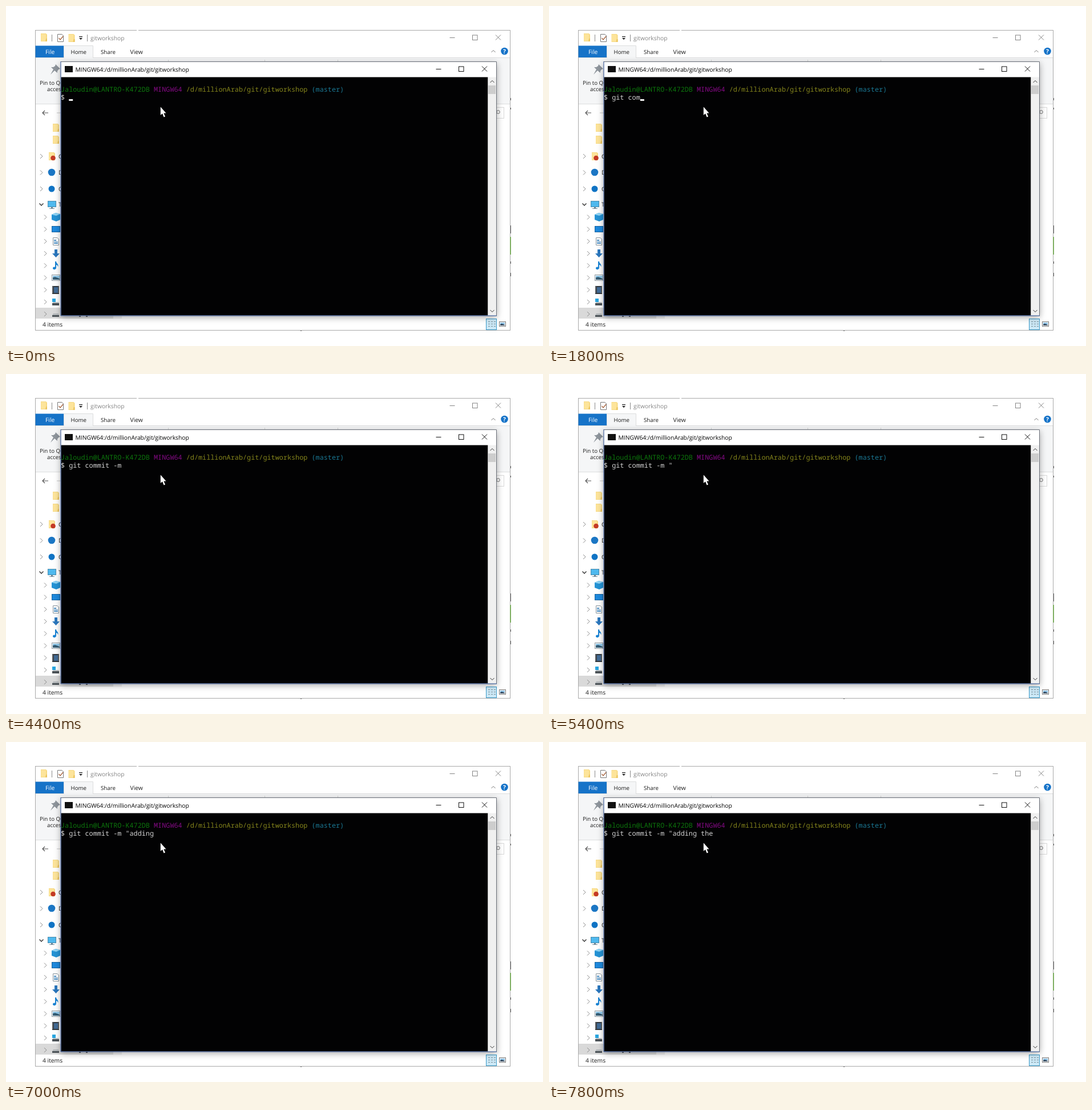
Recreate the animation shown at these times as an HTML page. Size 941x595 px, loop 8000 ms.

```html
<!DOCTYPE html>
<html lang="en">
<head>
<meta charset="utf-8">
<title>Terminal typing</title>
<style>
  html, body { margin: 0; width: 100%; height: 100%; overflow: hidden; background: #fff; }
  svg { display: block; width: 941px; height: 595px; }
  text { white-space: pre; text-rendering: geometricPrecision; }
  .ui { font: 10.3px "Open Sans", "Noto Sans", sans-serif; fill: #1c1c1c; }
  .small { font-size: 9.7px; }
  .mono { font: 11.82px "Noto Sans Mono", "DejaVu Sans Mono", monospace; }
  .line { fill: none; stroke-width: 1; }
</style>
</head>
<body>
<svg viewBox="0 0 941 595">
  <defs>
    <filter id="shadow" x="-5%" y="-5%" width="110%" height="112%">
      <feDropShadow dx="0" dy="3" stdDeviation="6" flood-color="#000" flood-opacity=".34"/>
    </filter>
    <g id="folder">
      <path d="M0 0H9L11 2V14H0Z" fill="#f6d983"/>
      <path d="M.5 1H9V13H.5Z" fill="#fde49a"/>
      <path d="M9 9H11V14H8Z" fill="#ecc661"/>
    </g>
    <path id="right" class="line" d="M-2 -4L2 0L-2 4"/>
    <path id="up" class="line" d="M-3.5 2L0 -1.5L3.5 2"/>
    <g id="controls" class="line">
      <path d="M-44.500 .5H-35.500"/>
      <rect x="-4.500" y="-4" width="8.500" height="8.500"/>
      <path d="M36 -4.500L45 4.500M45 -4.500L36 4.500"/>
    </g>
  </defs>

  <!-- File manager -->
  <rect x="51.500" y="42.500" width="832" height="525" fill="#fff" stroke="#a9a9a9"/>
  <rect x="229" y="42" width="3" height="1" fill="#fff"/>
  <rect x="516" y="568" width="2" height="1" fill="#777"/>
  <g fill="#666">
    <rect x="884" y="161" width="1" height="4"/>
    <rect x="884" y="178" width="1" height="3"/>
    <rect x="884" y="384" width="1" height="14"/>
    <rect x="883" y="404" width="2" height="31" fill="#7fae62"/>
    <rect x="884" y="447" width="1" height="4"/>
    <rect x="884" y="467" width="1" height="6"/>
  </g>
  <use href="#folder" x="61" y="48"/>
  <use href="#folder" x="109.500" y="49"/>
  <path class="line" d="M80.500 50V62M142.500 50V62" stroke="#8a8a8a"/>
  <path class="line" d="M90.500 49.500H98L100.500 52V62.500H90.500Z" stroke="#777"/>
  <path class="line" d="M92.500 56L95 59L100 53" stroke="#a8643f" style="stroke-width:1.300"/>
  <path d="M128 53H134V54.200H128ZM128 56H134L131 59Z" fill="#222"/>
  <text class="ui" x="148" y="59.500" style="fill:#858585">gitworkshop</text>
  <use href="#controls" x="822" y="55" stroke="#848484"/>

  <rect x="52" y="90" width="831" height="81" fill="#f5f6f7"/>
  <path class="line" d="M52 90.500H883M52 171.500H883" stroke="#dcddde"/>
  <rect x="51.500" y="69.500" width="50" height="20.500" fill="#1673c8"/>
  <path d="M101.500 91V69.500H152.500V91" fill="#f5f6f7" stroke="#dcddde"/>
  <g class="ui">
    <text x="69" y="83.500" style="fill:#fff">File</text>
    <text x="113.500" y="83.500" class="small">Home</text>
    <text x="166" y="83.500" class="small">Share</text>
    <text x="217.500" y="83.500">View</text>
    <text x="59" y="137.500" class="small">Pin to Quick</text>
    <text x="72" y="149" class="small">access</text>
    <text x="64" y="561">4 items</text>
  </g>
  <use href="#up" x="854" y="79" stroke="#777"/>
  <circle cx="873.500" cy="79" r="6.300" fill="#1673c8"/>
  <text class="ui" x="873.500" y="82.700" text-anchor="middle" style="fill:#fff;font-weight:700">?</text>
  <path d="M87 102L95 110L92 111L90 114L90 117L85 113L78 120L83 111L79 107H83L86 105Z" fill="#8d949b"/>
  <path class="line" d="M284.500 94V98M453.500 94V98M581.500 94V98" stroke="#d5d6d7"/>

  <path class="line" d="M74 187H64M68 183L64 187L68 191" stroke="#555" style="stroke-width:1.200"/>
  <path class="line" d="M89 187H96" stroke="#c4c4c4"/>
  <rect x="700.500" y="177.500" width="172" height="19" fill="#fff" stroke="#d9d9d9"/>
  <circle class="line" cx="862.500" cy="185.500" r="2.800" stroke="#666"/>

  <!-- Navigation pane -->
  <rect x="52" y="528" width="136" height="19" fill="#d9d9d9"/>
  <rect x="188" y="528" width="15" height="19" fill="#efefef"/>
  <g id="chevrons" stroke="#8c8c8c"></g>
  <path class="line" d="M58.500 345.500L62 349L65.500 345.500" stroke="#333" style="stroke-width:1.400"/>
  <g class="ui">
    <text x="92" y="267">C</text>
    <text x="92" y="295">D</text>
    <text x="92" y="324">O</text>
    <text x="92" y="351">T</text>
  </g>
  <use href="#folder" x="82" y="206"/>
  <use href="#folder" x="82" y="227"/>
  <use href="#folder" x="75" y="256"/>
  <circle cx="82.500" cy="266" r="4.300" fill="#c43a25"/>
  <circle cx="80" cy="291" r="6.300" fill="#1b76c4"/>
  <circle cx="80" cy="320" r="5.500" fill="#0f73c4"/>
  <rect x="73.500" y="341.500" width="14" height="10" fill="#4fb9ee" stroke="#4b8cad"/>
  <path d="M79 352H82V354H85V355H76V354H79Z" fill="#6f8796"/>
  <path d="M80 365L87 362L95 364V374L88 377L80 374Z" fill="#2492d4"/>
  <path d="M80 365L87 362L95 364L88 367Z" fill="#8fd3f4"/>
  <rect x="80.500" y="385.500" width="14" height="10" fill="#1d88dc" stroke="#17639f"/>
  <path d="M82.500 405.500H90L92.500 408V418.500H82.500Z" fill="#fff" stroke="#87949d"/>
  <path d="M84 409H88V411H84ZM84 412H91V413H84ZM84 414H91V416H84Z" fill="#4c8fc4"/>
  <path d="M85 426H90V433H94L87.500 440L81 433H85Z" fill="#2b77bd"/>
  <path d="M86 447H88C88 451 93 451 91 457C91 453 88 453 88 453V458C88 462 82 462 82 459C82 457 84 456 86 457Z" fill="#1b84d4"/>
  <rect x="80.500" y="470.500" width="14" height="10" fill="#fff" stroke="#8b979e"/>
  <path d="M82 472H94V476H82Z" fill="#8fc8ea"/>
  <path d="M82 475L86 474L94 477V479H82Z" fill="#345d75"/>
  <rect x="81" y="490" width="12" height="14" fill="#30363c"/>
  <rect x="84" y="492" width="7" height="10" fill="#426b96"/>
  <path d="M82 491V503M92 491V503" stroke="#ccc" stroke-dasharray="1 1"/>
  <rect x="81" y="512" width="6" height="6" fill="#29a5df"/>
  <path d="M83 518H92L93 520H81Z" fill="#c2c6c9"/>
  <rect x="81" y="520" width="12" height="4" fill="#4c5358"/>
  <path d="M83 538H92L93 541H81Z" fill="#b4b8bb"/>
  <rect x="81" y="541" width="12" height="3" fill="#4c5358"/>
  <path d="M128 542H131V544H128ZM140 542H143V544H140Z" fill="#555"/>

  <!-- Status bar view buttons -->
  <rect x="841.500" y="547.500" width="18" height="19" fill="#cbe8f6" stroke="#3c9bc9"/>
  <path class="line" d="M845 552.500H848M845 556.500H848M845 560.500H848M850 552.500H853M855 552.500H858M850 556.500H853M855 556.500H858M850 560.500H853M855 560.500H858" stroke="#7d8d96"/>
  <rect x="864.500" y="552.500" width="11" height="8" fill="#fff" stroke="#777"/>
  <path d="M866 554H874V557H866Z" fill="#8fc3e6"/>
  <path d="M866 557L869 556L874 558V559H866Z" fill="#31465c"/>

  <!-- Terminal -->
  <rect x="96" y="97" width="764" height="445" fill="#fff" filter="url(#shadow)"/>
  <rect x="96.500" y="124.500" width="748" height="417" fill="#020203"/>
  <rect x="844.500" y="124.500" width="15" height="417" fill="#f0f0f0"/>
  <rect x="845" y="139" width="13" height="15" fill="#cdcdcd"/>
  <use href="#up" x="852" y="132" stroke="#333" style="stroke-width:1.400"/>
  <use href="#up" transform="translate(852 534) scale(1 -1)" stroke="#333"/>
  <path class="line" d="M96 97.500H859.500V542" stroke="#6a6f78"/>
  <path class="line" d="M96 97V542H860" stroke="#25498f"/>
  <rect x="103" y="105" width="14" height="11" fill="#111"/>
  <text class="ui" x="121.500" y="114.500" style="fill:#000">MINGW64:/d/millionArab/git/gitworkshop</text>
  <use href="#controls" x="798" y="110" stroke="#111"/>
  <text class="mono" x="96" y="150"><tspan fill="#0d760d">Jaloudin@LANTRO-K472DB</tspan> <tspan fill="#850b85">MINGW64</tspan> <tspan fill="#85851c">/d/millionArab/git/gitworkshop</tspan> <tspan fill="#1b7894">(master)</tspan></text>
  <text class="mono" id="command" x="96" y="164" fill="#d2d2d2"></text>
  <rect id="caret" y="163" width="7" height="3" fill="#f0f0f0"/>
  <path d="M270.800 176.500V191L274 188.200L276.600 194.500L279 193.500L276.400 187.400H280.500Z" fill="#fff"/>
</svg>
<script>
  const LOOP = 8000, STEP = 200, CHAR = 7.092, LEFT = 96;
  const BLINK = 1060, OFF_FROM = 90, OFF_TO = 650;
  const prompt = "$ ", typed = 'git commit -m "adding the';
  // [time, characters typed]
  const keys = [
    [0, 0], [800, 1], [1000, 2], [1200, 3], [1400, 4], [1600, 5], [1800, 7],
    [2000, 8], [2200, 9], [2400, 10], [2800, 11],
    [3800, 12], [4200, 13], [4600, 14], [5200, 15],
    [5600, 16], [5800, 17], [6200, 18], [6400, 19], [6600, 20], [6800, 21],
    [7200, 22], [7600, 24], [7800, 25]
  ];
  const command = document.getElementById("command");
  const caret = document.getElementById("caret");

  const chevron = (x, y) => `<use href="#right" x="${x}" y="${y}"/>`;
  const rows = Array.from({ length: 9 }, (_, i) => chevron(69, 369.5 + i * 21.2));
  document.getElementById("chevrons").innerHTML =
    [263, 291.5, 320].map(y => chevron(62, y)).concat(rows).join("");

  function draw(time) {
    const t = Math.floor((time % LOOP) / STEP) * STEP;
    const count = keys.findLast(key => key[0] <= t)[1];
    const phase = t % BLINK;
    const line = prompt + typed.slice(0, count);
    command.textContent = line;
    caret.setAttribute("x", LEFT + line.length * CHAR);
    caret.style.visibility = phase > OFF_FROM && phase < OFF_TO ? "hidden" : "visible";
  }

  const start = performance.now();
  function tick() {
    draw(performance.now() - start);
    requestAnimationFrame(tick);
  }
  tick();
</script>
</body>
</html>
```
